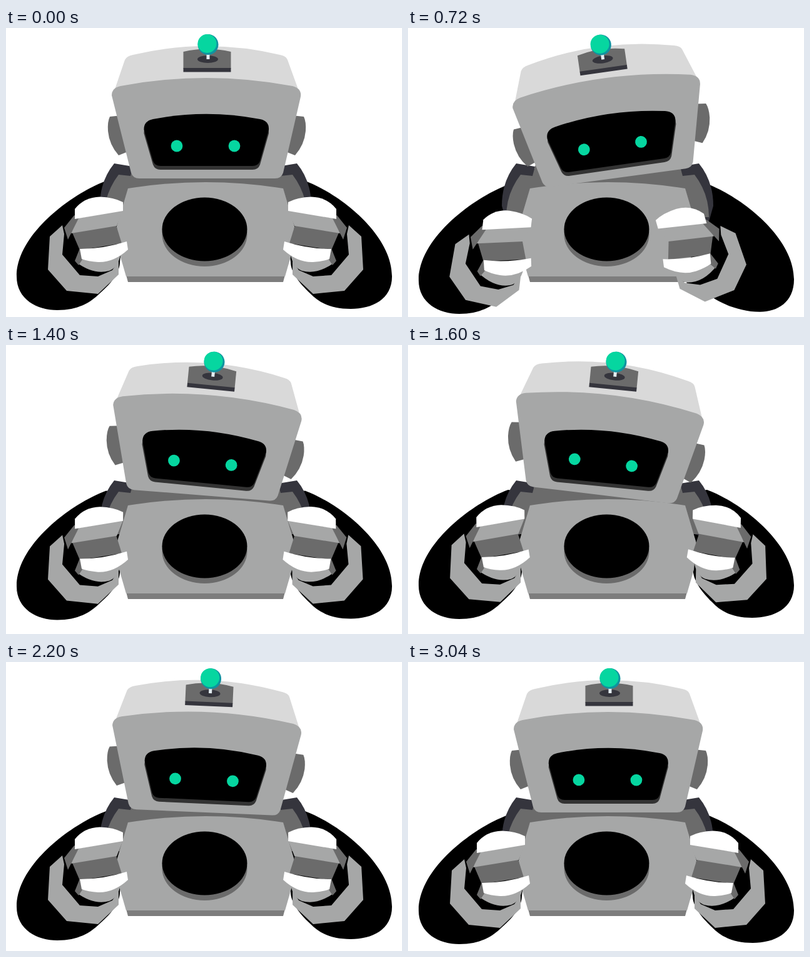
Write an HTML page that moves like this. It is 633 px wide and 463 px high and loops after 3080 ms.

```html
<!DOCTYPE html>
<html lang="en">
<head>
<meta charset="utf-8">
<title>Robot</title>
<style>
  html, body { margin: 0; width: 100%; height: 100%; overflow: hidden; background: #fff; }
  svg { display: block; width: 633px; height: 463px; }
  .light { fill: #d9d9d9; }
  .grey { fill: #a6a7a7; }
  .mid { fill: #6b6b6b; }
  .dark { fill: #35353d; }
  .teal { fill: #06d6a0; }
</style>
</head>
<body>
<svg viewBox="0 0 633 463">
  <defs>
    <g id="shoulder">
      <path class="dark" d="M173 217Q150 245 150 285L157 310 190 300 203 222Z"/>
      <path class="mid" d="M180 235Q157 265 157 303L197 303V262H320V215H205L199 237Z"/>
    </g>
    <path id="ear" class="mid" d="M166 142L195 139 205 194 180 204Q165 187 163 165 162 150 166 142Z"/>
    <path id="glass" d="M235 146Q320 129.500 406 146 421 149 420 163L406 213Q403 221 394 221H247Q238 221 235 213L220.500 163Q220 149 235 146Z"/>
    <g id="hand">
      <path d="M98 318L90 362 117 397 147 399 150 330Z"/>
      <path class="grey" d="M90 316L70 334 67 387 97 421 147 426 180 395 180 373 170 388 147 398 118 396 90 363 93 330Z"/>
      <path class="grey" d="M112 375Q140 396 165 389 180 383 183 362L121 366Z"/>
      <path class="mid" d="M118 353L122 371 116 380 110 373Z"/>
      <path class="mid" d="M106 328L176 316 185 345 118 356Z"/>
      <path class="grey" d="M113 305L187 292 177 317 104 329Z"/>
      <path class="mid" d="M109 300L116 305 99 339 93 320Z"/>
      <path fill="#fff" d="M110 290Q125 271 150 270.5 172 271 187 279V293L110 306Z"/>
      <path fill="#fff" d="M118 354Q155 354 193 342L195 355Q172 376 147 375 131 374 121 370Z"/>
    </g>
  </defs>

  <path id="armL" d="M160 245C106 265 17 330 17 398C17 435 50 452 82 452C115 452 135 440 150 425C170 408 182 390 182 375L190 300V250Z"/>
  <path id="armR"/>

  <use href="#shoulder"/>
  <use href="#shoulder" transform="translate(638) scale(-1 1)"/>

  <path fill="#7d7d7d" d="M195 257L177 318 184 366 195 407H443L454 366 461 318 443 257Z"/>
  <path class="grey" d="M195 257Q319 237 443 257L461 318 457 360 446 398H192L181 360 177 318Z"/>
  <ellipse class="mid" cx="317.5" cy="331" rx="68" ry="51"/>
  <ellipse cx="317.5" cy="322.5" rx="68" ry="51"/>

  <g id="head">
    <use href="#ear"/>
    <use href="#ear" transform="translate(642) scale(-1 1)"/>
    <path class="light" d="M174 98L190 51Q193 45 203 43 320 15 438 43 448 45 450 51L467 98Z"/>
    <path class="grey" d="M183 93Q320 67 458 93 473 97 471 110L443 232Q440 241 430 241H213Q203 241 200 232L169 108Q169 96 183 93Z"/>
  </g>
  <g id="visor">
    <use href="#glass" y="6" fill="#333"/>
    <use href="#glass"/>
  </g>
  <g id="eyes" class="teal">
    <circle cx="273" cy="189" r="9.4"/>
    <circle cx="365" cy="189" r="9.4"/>
  </g>
  <g id="antenna">
    <path class="mid" d="M283.500 38Q321 29 359.500 38V65H283.500Z"/>
    <path class="dark" d="M283.500 64H359.500V70.500H283.500Z"/>
    <ellipse class="dark" cx="322.500" cy="50" rx="16.500" ry="6"/>
    <path fill="#e4edf2" d="M320.500 40H325.500V50H320.500Z"/>
    <circle cx="323" cy="26.500" r="16.500" fill="#1093a0"/>
    <circle class="teal" cx="321.500" cy="25" r="15"/>
  </g>

  <g id="handL"><use href="#hand"/></g>
  <g id="handR"><use href="#hand" transform="translate(638) scale(-1 1)"/></g>
</svg>
<script>
const LOOP = 3080, STARTS = [70, 1095, 2120];
const set = (id, value, name = 'transform') => document.getElementById(id).setAttribute(name, value);
const clamp = x => Math.max(0, Math.min(1, x));

// Straight run to the pose, then a damped bounce around it.
function spring(t, arrive) {
  if (t < arrive) return clamp(t / arrive);
  const u = t - arrive;
  return 1 + 0.4 * Math.exp(-0.005 * u) * Math.sin(Math.PI * u / 140);
}

// Weights of the left-leaning, right-leaning and final upright poses.
function lean(ease) {
  const [a, b, c] = STARTS.map(ease);
  return [a - b, b - c, c];
}

function rightArm(k) {
  const x = 551 + 12 * k;
  return `M478 245C532 265 617 330 617 398C617 435 ${585 + 5 * k} 450 ${x} 450` +
    `C${x - 31} 450 ${500 + 2 * k} ${440 - 3 * k} ${486 + k} ${425 + 2 * k}` +
    `C${468 + 2 * k} ${408 + 12 * k} 455 ${390 + 24 * k} ${455 - 10 * k} ${375 + 43 * k}L447 300V250Z`;
}

function draw(t) {
  const [hl, hr] = lean(s => spring(t - s, 135));
  const [l, r] = lean(s => spring(t - s, 163));
  const [vl, vr, end] = lean(s => clamp((t - s) / 150));

  const headTurn = `rotate(${-7.9 * hl + 6.1 * hr} 320 130)`;
  set('head', headTurn);
  set('eyes', headTurn);

  const plateTurn = `rotate(${-8.2 * vl + 5.6 * vr} 320 129)`;
  const wide = 1 + 0.038 * vl - 0.005 * vr - 0.043 * end;
  set('antenna', plateTurn);
  set('visor', `${plateTurn} translate(320.5) scale(${wide} 1) translate(-320.5)`);

  const lift = -11.8 * r;
  set('armL', `translate(0 ${6.3 * l + lift})`);
  set('armR', `translate(0 ${5 * l + lift})`);
  set('armR', rightArm(l), 'd');
  set('handL', `translate(${4.5 * l} ${20 * l + lift}) rotate(${7 * l} 130 340)`);
  set('handR', `translate(${-42 * l} ${11.5 * l + lift}) rotate(${-16.5 * l} 508 340)`);
}

const begin = performance.now();
function tick() {
  draw((performance.now() - begin) % LOOP);
  requestAnimationFrame(tick);
}
tick();
</script>
</body>
</html>
```
